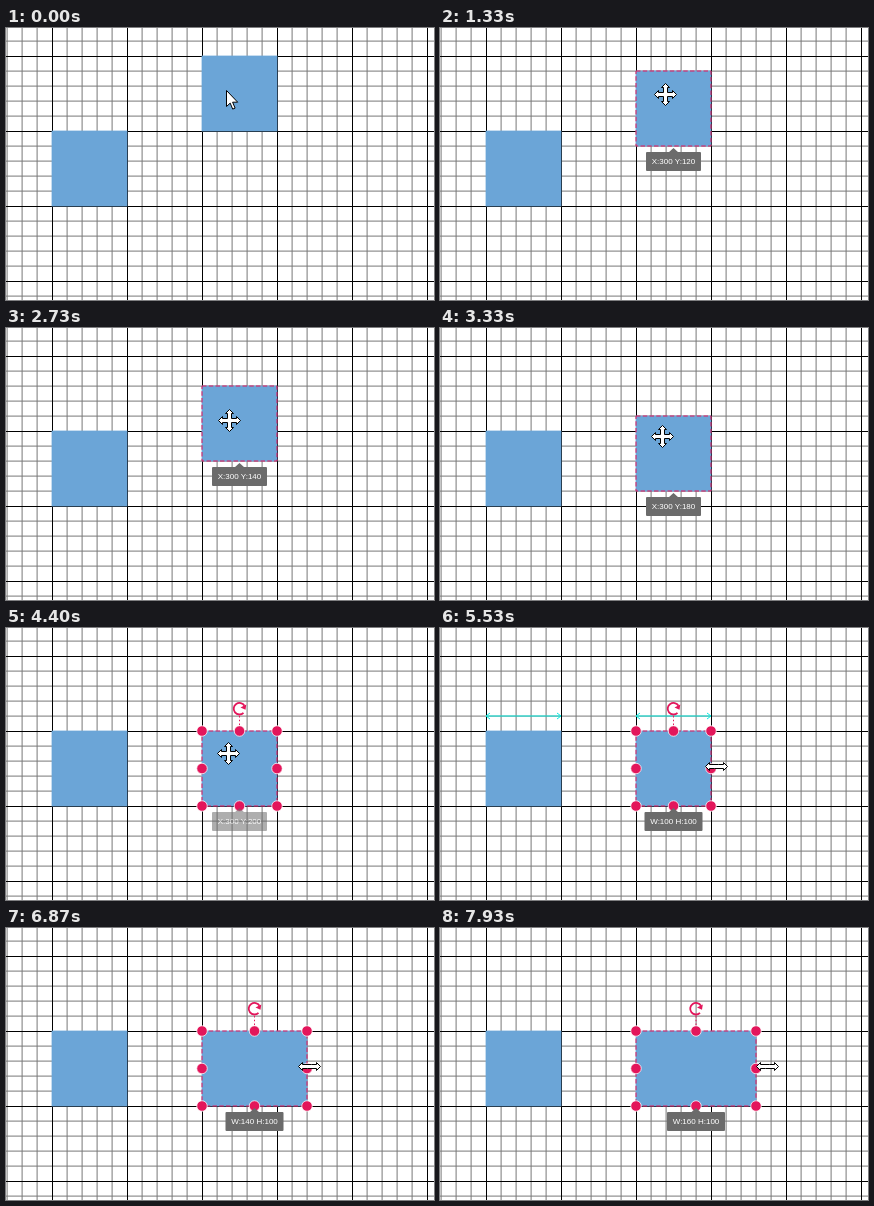
Write an HTML page that moves like this. It is 428x272 px and loops after 8000 ms.

```html
<!DOCTYPE html>
<html lang="en">
<head>
<meta charset="utf-8">
<title>Snap to grid</title>
<style>
  html, body { margin: 0; width: 100%; height: 100%; overflow: hidden; background: #fff; }
  svg { display: block; width: 100vw; height: 100vh; }
  #minor { stroke: #777; }
  #major { stroke: #000; shape-rendering: crispEdges; }
  .shape { fill: #6ba5d7; stroke: #6ba5d7; stroke-width: .75; }
  .frame { fill: none; stroke: #e3165b; stroke-dasharray: 4.5 2.25; }
  .knob { fill: #e3165b; stroke: #fff; stroke-width: .75; }
  .stem { stroke: #e3165b; stroke-dasharray: 1.5 2.25; }
  .arc { fill: none; stroke: #e3165b; stroke-width: 1.8; }
  .guide { fill: none; stroke: #07ede1; }
  .tip { fill: #6b6b6b; }
  .label { fill: #fff; font: 8px "Liberation Sans", Arial, sans-serif; text-anchor: middle; }
  .cursor { fill: #fff; stroke: #000; }
</style>
</head>
<body>
<svg viewBox="0 0 428 272">
  <path id="minor"/>
  <path id="major"/>
  <rect class="shape" x="46" y="103" width="75" height="75"/>
  <rect class="shape" id="box"/>
  <rect class="frame" id="frame"/>
  <path class="guide" id="guide"/>
  <g id="handles">
    <g id="rotor">
      <path class="stem" d="M0 -15V0"/>
      <path class="arc" d="M4 -18.1A5.8 5.8 0 1 1 5 -25.2"/>
      <path fill="#e3165b" d="M6 -21.2L6.8 -26.5L1 -23.5Z"/>
    </g>
  </g>
  <g id="tip">
    <path class="tip" d="M-5 .5L0 -4L5 .5Z"/>
    <rect class="tip" id="tipBox" height="19" rx="1"/>
    <text class="label" id="label" y="12.2"></text>
  </g>
  <path class="cursor" id="cursor"/>
</svg>
<script>
const LOOP = 8000, STEP = 1000 / 15, CELL = 15, SIDE = 75, LEFT = 196, TOP = 28;
const SELECT = 10, HOVER = 17, GRAB = 19, DROP = 65, RESIZE = 83;
const $ = id => document.getElementById(id);
const set = (el, attrs) => { for (const k in attrs) el.setAttribute(k, attrs[k]); };
const show = (el, on) => set(el, { visibility: on ? 'visible' : 'hidden' });

// pointer strokes: first tick, last tick, end point; it rests in between
const moves = [
  [0, 2, 225, 54], [18, 20, 225, 66], [25, 34, 223, 88], [38, 43, 223, 95],
  [47, 51, 222, 112], [55, 61, 222, 125], [71, 75, 275, 138], [82, 84, 277, 138],
  [86, 91, 289, 138], [96, 103, 303, 138], [106, 110, 321, 138], [116, 119, 327, 138]
];

function pointer(n) {
  let x = 220, y = 62;
  for (const [from, to, ex, ey] of moves) {
    const f = Math.max(0, Math.min(1, (n - from) / (to - from)));
    x += (ex - x) * f;
    y += (ey - y) * f;
  }
  return [Math.round(x), Math.round(y)];
}

// one arrow arm pointing up, turned by quarter turns and joined
const arm = [[-2, -2], [-2, -7], [-4, -7], [0, -11], [4, -7], [2, -7]];
const turn = ([x, y], q) => q ? turn([-y, x], q - 1) : [x, y];
const arms = quarters => 'M' + quarters.flatMap(q => arm.map(p => turn(p, q).join(' '))).join('L') + 'Z';
const cursors = {
  arrow: 'M0 0V16L3.7 12.6L6.2 18.6L8.6 17.6L6.1 11.7H11.2Z',
  move: arms([0, 1, 2, 3]),
  resize: arms([1, 3])
};

function drawGrid() {
  const lines = { minor: '', major: '' };
  for (let i = -3; i < 26; i++) {
    const id = i % 5 ? 'minor' : 'major';
    const shift = i % 5 ? .1 : .5;
    lines[id] += `M${46 + shift + i * CELL} 0V272M0 ${28 + shift + i * CELL}H428`;
  }
  for (const id in lines) set($(id), { d: lines[id] });
}

const knobs = [];
function makeKnobs() {
  for (let i = 0; i < 9; i++) {
    if (i === 4) continue;
    const el = document.createElementNS('http://www.w3.org/2000/svg', 'circle');
    set(el, { class: 'knob', r: 5.25 });
    $('handles').append(el);
    knobs.push({ el, c: i % 3 / 2, r: Math.floor(i / 3) / 2 });
  }
}

// double arrow marking equal widths
const span = (x, y, w) =>
  `M${x} ${y}h${w}m-4 -3l4 3l-4 3M${x + 4} ${y - 3}l-4 3l4 3`;

function render(time) {
  const n = Math.min(119, Math.floor((time + 4) / STEP));
  const [px, py] = pointer(n);
  const dragging = n >= GRAB && n < DROP, resizing = n >= RESIZE;
  const rows = n < GRAB ? 0 : n >= DROP ? 5 : Math.round((py - 55) / CELL);
  const cols = resizing ? Math.round((px - 275.5) / CELL) : 0;
  const y = TOP + rows * CELL, w = SIDE + cols * CELL, mid = LEFT + w / 2;

  const rect = { x: LEFT, y, width: w, height: SIDE };
  set($('box'), rect);
  set($('frame'), rect);
  show($('frame'), n >= SELECT);

  show($('handles'), n >= SELECT && !dragging);
  set($('rotor'), { transform: `translate(${mid} ${y})` });
  for (const k of knobs) set(k.el, { cx: LEFT + w * k.c, cy: y + SIDE * k.r });

  const aligned = dragging && !rows, sameWidth = resizing && !cols;
  show($('guide'), aligned || sameWidth);
  set($('guide'), { d: aligned ? 'M46 103H271' : span(46, 88, SIDE) + span(LEFT, 88, SIDE) });

  const fade = n < DROP || resizing ? 1 : Math.max(0, 1 - (n - DROP + 1) / 4.4);
  const tipW = resizing ? 58 : 55;
  show($('tip'), n >= GRAB && fade > 0);
  set($('tip'), { transform: `translate(${mid} ${y + SIDE + 6})`, opacity: fade });
  set($('tipBox'), { x: -tipW / 2, width: tipW });
  $('label').textContent = resizing ? `W:${100 + cols * 20} H:100` : `X:300 Y:${100 + rows * 20}`;

  const kind = n < HOVER ? 'arrow' : px >= 268 ? 'resize' : 'move';
  set($('cursor'), { d: cursors[kind], transform: `translate(${px + .5} ${py + .5})` });
}

drawGrid();
makeKnobs();
const start = performance.now();
function tick() {
  render((performance.now() - start) % LOOP);
  requestAnimationFrame(tick);
}
tick();
</script>
</body>
</html>
```
